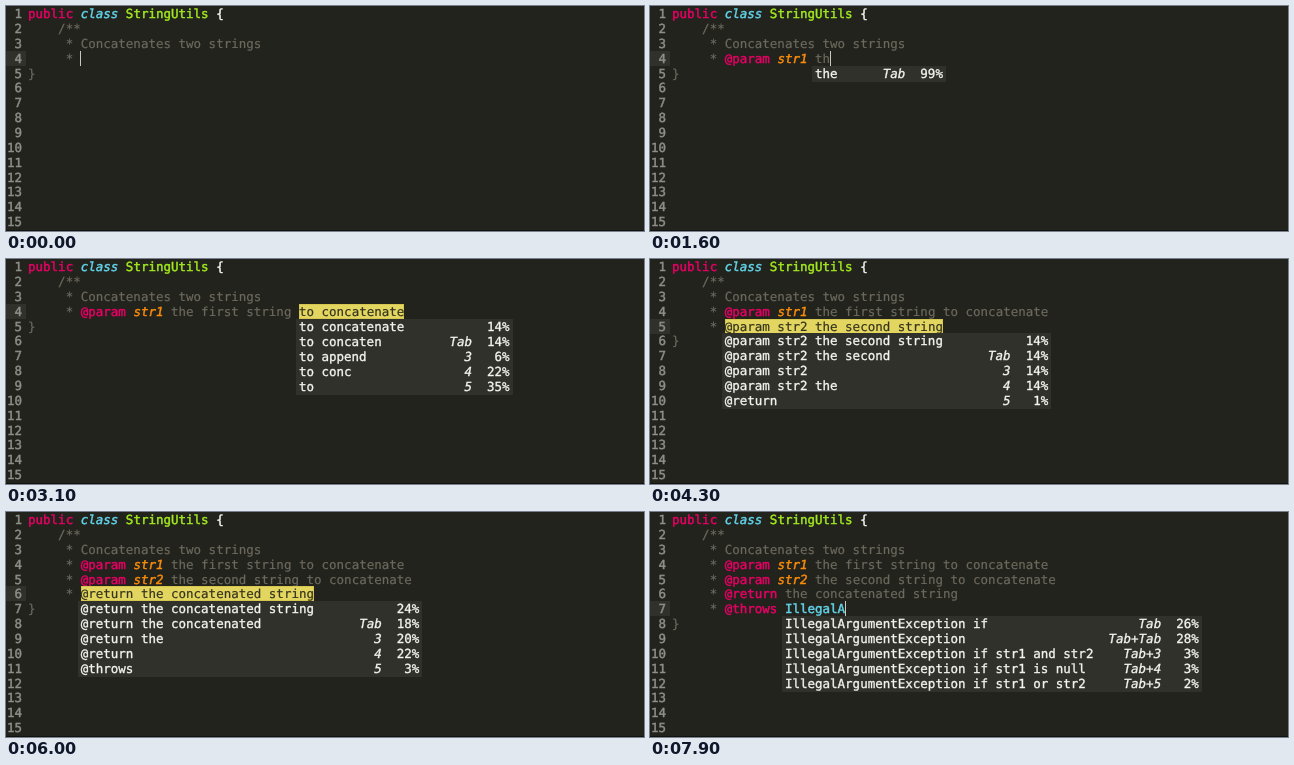
Animation of 638x225 px, one loop 8000 ms. Source, as an HTML page:

```html
<!DOCTYPE html>
<html lang="en">
<head>
<meta charset="utf-8">
<title>Code completion</title>
<style>
  html, body { margin: 0; width: 100%; height: 100%; overflow: hidden; background: #22231d; }
  #stage {
    position: relative; width: 638px; height: 225px; overflow: hidden;
    font: 12.5px/15px "DejaVu Sans Mono", monospace;
    text-rendering: geometricPrecision; color: #6c695d; -webkit-text-stroke: .2px;
  }
  #stage::after { content: ""; position: absolute; left: 0; right: 0; bottom: 0; height: 1px; background: #12120f; }
  #stage div { position: absolute; white-space: pre; }
  .num { left: 0; width: 16px; padding-right: 4px; text-align: right; color: #8e8f88; -webkit-text-stroke: .45px; }
  .num.on { background: #30312b; }
  .line { left: 22px; }
  .key, .type, .name, .arg, .plain { -webkit-text-stroke: .45px; }
  .key { color: #e60064; }
  .type { color: #62d4ea; }
  .name { color: #a3ea1e; }
  .arg { color: #fa8c0a; font-style: italic; }
  .plain { color: #f8f8f2; }
  .pick { display: inline-block; background: #e2d560; color: #35341f; box-shadow: inset 0 0 0 1px #d5c64f; }
  #caret { width: 1px; height: 15px; background: #c8c8c0; }
  #menu { background: #30312b; color: #f4f4ee; padding: 0 3px 1px; -webkit-text-stroke: .35px; }
</style>
</head>
<body>
<div id="stage"></div>
<script>
const CHAR = 7.525, ROW = 14.86, LEFT = 22, LOOP = 8000;
const stage = document.getElementById("stage");

const head = [
  '<span class="key">public</span> <i class="type">class</i> <span class="name">StringUtils</span> <span class="plain">{</span>',
  "    /**",
  "     * Concatenates two strings"
];

// A word starts at a time; its menu is "text|percent" items.
const typed = (at, text, ...menu) => ({ at, text, menu });
const picked = (at, text, ...menu) => ({ at, text, menu, pick: true });

const tags = [
  [
    typed(-500, "*"),
    picked(0, "@param str1", "@param str1|32%", "@param str1 string|14%", "@param str1 the|12%", "@param|9%", "@return|4%"),
    typed(1100, "the", "the|99%"),
    picked(1700, "first string", "first string|38%", "first string to|21%", "first|35%"),
    picked(2500, "to concatenate", "to concatenate|14%", "to concaten|14%", "to append|6%", "to conc|22%", "to|35%")
  ], [
    typed(3500, "*"),
    picked(4000, "@param str2 the second string", "@param str2 the second string|14%", "@param str2 the second|14%",
      "@param str2|14%", "@param str2 the|14%", "@return|1%"),
    picked(4400, "to concatenate", "to concatenate|42%", "to concaten|18%", "to append to it|6%", "to conc|12%", "to|20%")
  ], [
    typed(5000, "*"),
    picked(5400, "@return the concatenated string", "@return the concatenated string|24%", "@return the concatenated|18%",
      "@return the|20%", "@return|22%", "@throws|3%")
  ], [
    typed(6600, "*"),
    picked(6900, "@throws", "@throws|42%", "@throws Illegal|20%", "@throws IO|8%", "@throws Null|5%", "@see|2%"),
    typed(7300, "IllegalA", "IllegalArgumentException if|26%", "IllegalArgumentException|28%",
      "IllegalArgumentException if str1 and str2|3%", "IllegalArgumentException if str1 is null|3%",
      "IllegalArgumentException if str1 or str2|2%")
  ]
];

const x = col => LEFT + col * CHAR;
const y = row => Math.round(row * ROW + 0.15);
const join = words => words.map(w => w.text).join(" ");

const paint = s => s
  .replace(/(@param )(\w+)/, '$1<span class="arg">$2</span>')
  .replace(/(@throws )(\w+)/, '$1<span class="type">$2</span>')
  .replace(/@(param|return|throws)\b/, '<span class="key">$&</span>');

// How a word stands after a fraction f of its time.
function pose({ text, menu, pick }, f) {
  if (!pick) {
    const n = Math.floor(Math.min(1, f / 0.85) * text.length);
    return { done: text.slice(0, n), open: menu.length > 0 && n > text.length / 2 };
  }
  if (f < 0.1) return { done: "" };
  if (f < 0.4) return { done: text[0] === "@" ? "@" : "", open: true };
  if (f < 0.8) return { done: "", chosen: text, open: true };
  return { done: text };
}

function menuHtml(menu, col, row, chosen) {
  const items = menu.map(s => s.split("|"));
  const width = Math.max(...items.map(([text]) => text.length));
  const keyOf = i => chosen
    ? ["", "Tab"][i] ?? String(i + 1)
    : ["Tab", "Tab+Tab"][i] ?? "Tab+" + (i + 1);
  const rows = items.map(([text, percent], i) =>
    `${text.padEnd(width)}  <i>${keyOf(i).padStart(7)}</i>  ${percent.padStart(3)}`);
  return `<div id="menu" style="left:${x(col) - 3}px;top:${y(row)}px">${rows.join("\n")}</div>`;
}

function view(t) {
  const tag = tags.findLastIndex(words => words[0].at <= t);
  const words = tags[tag];
  const i = words.findLastIndex(w => w.at <= t);
  const word = words[i];
  const end = (words[i + 1] ?? tags[tag + 1]?.[0])?.at ?? LOOP;
  const { done, chosen, open } = pose(word, (t - word.at) / (end - word.at));

  const row = head.length + tag;
  const before = "     " + join(words.slice(0, i)) + (i ? " " : "");
  const pick = chosen ? `<span class="pick">${chosen}</span>` : "";
  const lines = [
    ...head,
    ...tags.slice(0, tag).map(w => "     " + paint(join(w))),
    paint(before + done) + pick,
    "}"
  ];

  let html = "";
  for (let n = 0; n < 15; n++)
    html += `<div class="num${n === row ? " on" : ""}" style="top:${y(n)}px">${n + 1}</div>`;
  lines.forEach((s, n) => html += `<div class="line" style="top:${y(n)}px">${s}</div>`);
  if (!chosen)
    html += `<div id="caret" style="left:${Math.floor(x(before.length + done.length))}px;top:${y(row)}px"></div>`;
  if (open) html += menuHtml(word.menu, before.length, row + 1, chosen);
  return html;
}

let shown;
function tick() {
  const html = view(performance.now() % LOOP);
  if (html !== shown) stage.innerHTML = shown = html;
  requestAnimationFrame(tick);
}
tick();
</script>
</body>
</html>
```
